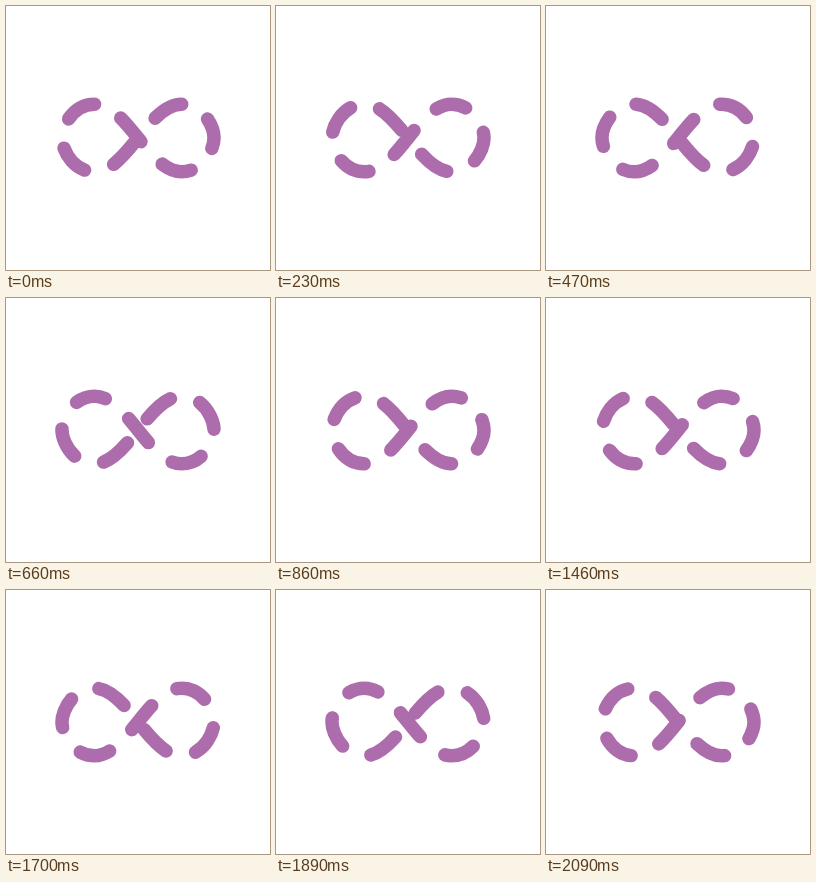
These frames come from a looping animation (264x264 px, 2130 ms). An HTML page with a canvas:

```html
<!DOCTYPE html>
<html lang="en">
<head>
<meta charset="utf-8">
<title>Infinity loader</title>
<style>
  html, body { margin: 0; width: 100%; height: 100%; overflow: hidden; background: #fff; }
  canvas { display: block; width: 264px; height: 264px; }
</style>
</head>
<body>
<canvas id="stage"></canvas>
<script>
const SIZE = 264, LOOP = 2130, STEPS = 64, DASHES = 7;
const LENGTH = 256.589; // length of the figure eight in its own units
const SCALE = SIZE / 100 * 0.64;
const LEAD = 8; // ms, absorbs uneven step lengths

const canvas = document.getElementById('stage');
const ctx = canvas.getContext('2d');
const ratio = window.devicePixelRatio || 1;
canvas.width = canvas.height = Math.round(SIZE * ratio);

const eight = new Path2D(
  'M24.3 30C11.4 30 5 43.3 5 50s6.4 20 19.3 20c19.3 0 32.1-40 51.4-40' +
  'C88.6 30 95 43.3 95 50s-6.4 20-19.3 20C56.4 70 43.6 30 24.3 30z');
const dash = LENGTH / (2 * DASHES);

function draw(time) {
  const step = Math.min(STEPS - 1, Math.floor((time % LOOP + LEAD) * STEPS / LOOP));
  ctx.setTransform(ratio, 0, 0, ratio, 0, 0);
  ctx.fillStyle = '#fff';
  ctx.fillRect(0, 0, SIZE, SIZE);
  ctx.translate(SIZE / 2, SIZE / 2);
  ctx.scale(SCALE, SCALE);
  ctx.translate(-50, -50);
  ctx.strokeStyle = '#ad6cab';
  ctx.lineWidth = 8;
  ctx.lineCap = 'round';
  ctx.setLineDash([dash, dash]);
  ctx.lineDashOffset = LENGTH * step / STEPS;
  ctx.stroke(eight);
}

const start = performance.now();
function tick() {
  draw(performance.now() - start);
  requestAnimationFrame(tick);
}
tick();
</script>
</body>
</html>
```
